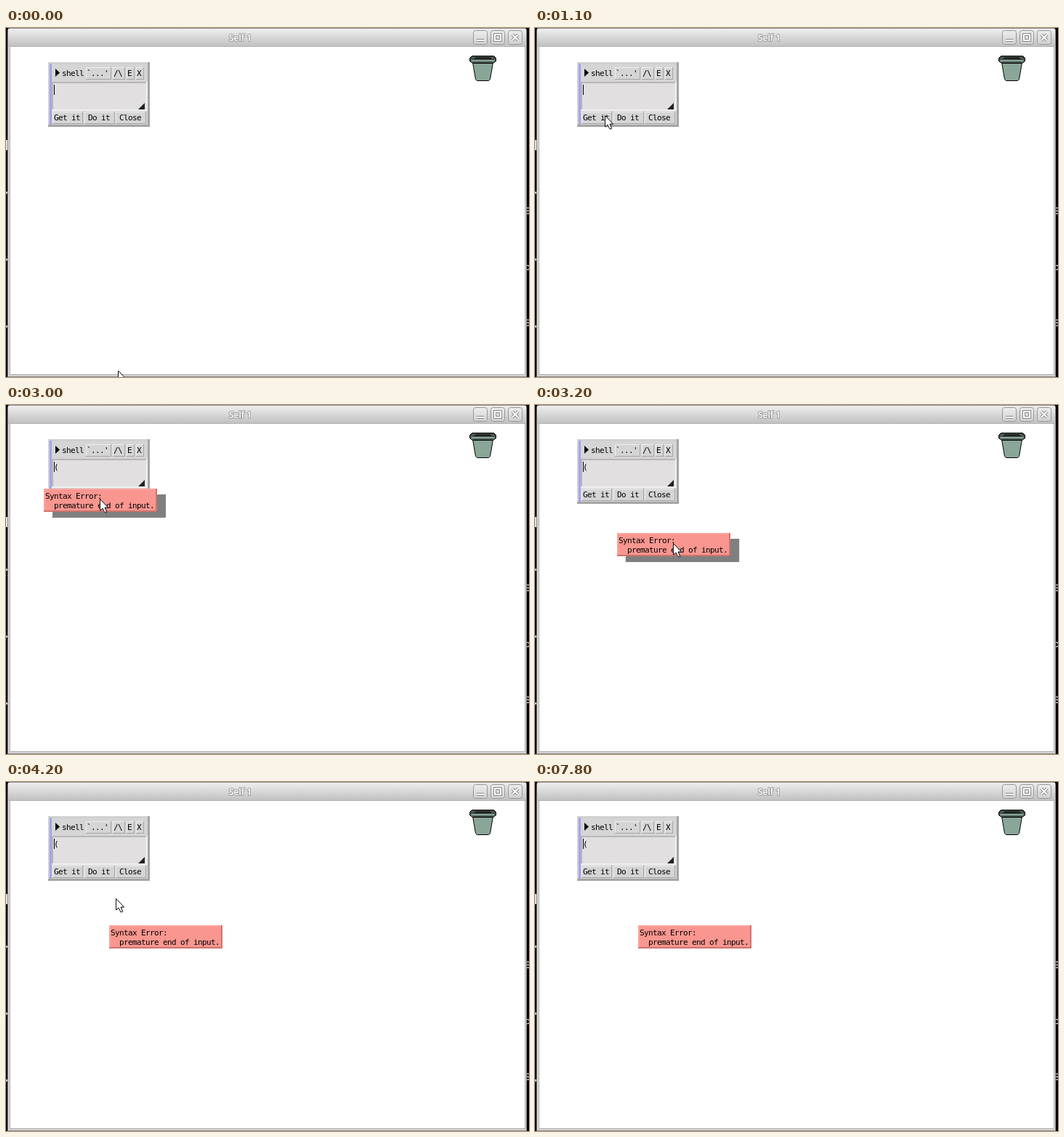
An HTML page with a canvas that plays this animation: 720 by 480 pixels, repeating every 8 s.

```html
<!DOCTYPE html>
<html lang="en">
<head>
<meta charset="utf-8">
<title>Shell error</title>
<style>
html, body { margin: 0; width: 100%; height: 100%; overflow: hidden; background: #fff; }
canvas { display: block; }
</style>
</head>
<body>
<canvas id="stage" width="720" height="480"></canvas>
<script>
const ctx = document.getElementById('stage').getContext('2d');
const LOOP = 8000, STEP = 100;
const TYPED = 1700, PRESSED = 2300, FAILED = 2500, DROPPED = 3700, GONE = 7800;
const CHAR = 6;
const PANEL = '#d6d5d6', FIELD = '#e2dfe1', LIGHT = '#efeeef', SHADE = '#a5a5a5';

// Pointer gestures; it rests between them
const start = { x: 154, y: 471 };
const moves = [
  { from: 100, to: 1000, x: 96, y: 120 },
  { from: 2900, to: 3000, x: 129, y: 129 },
  { from: 3000, to: 3200, x: 190, y: 190 },
  { from: 3200, to: 3700, x: 219, y: 211 },
  { from: 3700, to: 4200, x: 151, y: 160 },
  { from: 7600, to: 7700, x: 76, y: 172 }
];

function pointerAt(t) {
  let { x, y } = start;
  for (const m of moves) {
    const u = Math.min(1, Math.max(0, (t - m.from) / (m.to - m.from)));
    const eased = Math.sin(u * Math.PI / 2);
    x += (m.x - x) * eased;
    y += (m.y - y) * eased;
  }
  return { x: Math.round(x), y: Math.round(y) };
}

function rect(x, y, w, h, color) {
  ctx.fillStyle = color;
  ctx.fillRect(x, y, w, h);
}

function poly(points, fill, stroke) {
  ctx.beginPath();
  points.forEach(([x, y]) => ctx.lineTo(x, y));
  ctx.closePath();
  if (fill) { ctx.fillStyle = fill; ctx.fill(); }
  if (stroke) { ctx.strokeStyle = stroke; ctx.stroke(); }
}

// Shape symmetric about cx, given as [y, half width] from top to bottom
function symmetric(cx, rows, fill, stroke) {
  const left = rows.map(([y, r]) => [cx - r, y]);
  const right = rows.map(([y, r]) => [cx + r, y]);
  poly([...left, ...right.reverse()], fill, stroke);
}

function bevel(x, y, w, h, fill, light, dark, size) {
  rect(x, y, w, h, dark);
  rect(x, y, w - size, h - size, light);
  rect(x + size, y + size, w - 2 * size, h - 2 * size, fill);
}

function mono(text, x, y) {
  ctx.font = '11px "DejaVu Sans Mono", monospace';
  ctx.letterSpacing = '-0.62px';
  ctx.fillStyle = '#000';
  ctx.fillText(text, x, y);
  ctx.letterSpacing = '0px';
}

function checker() {
  const tile = document.createElement('canvas');
  tile.width = tile.height = 2;
  const c = tile.getContext('2d');
  c.fillRect(0, 0, 1, 1);
  c.fillRect(1, 1, 1, 1);
  return ctx.createPattern(tile, 'repeat');
}
const dots = checker();

function vertical(y0, y1, top, bottom) {
  const g = ctx.createLinearGradient(0, y0, 0, y1);
  g.addColorStop(0, top);
  g.addColorStop(1, bottom);
  return g;
}

function titleButton(x, drawIcon) {
  ctx.beginPath();
  ctx.roundRect(x + .5, 3.5, 19, 19, 3);
  ctx.fillStyle = vertical(3, 23, '#eee', '#cfcfcf');
  ctx.fill();
  ctx.strokeStyle = '#989898';
  ctx.stroke();
  ctx.beginPath();
  drawIcon(x + 6, 9, 8);
  for (const [width, color] of [[4, '#8a8a8a'], [2, '#fff']]) {
    ctx.lineWidth = width;
    ctx.strokeStyle = color;
    ctx.stroke();
  }
  ctx.lineWidth = 1;
}

const titleIcons = [
  (x, y, s) => { ctx.moveTo(x - 1, y + s); ctx.lineTo(x + s + 1, y + s); },
  (x, y, s) => ctx.rect(x, y, s, s),
  (x, y, s) => {
    ctx.moveTo(x, y); ctx.lineTo(x + s, y + s);
    ctx.moveTo(x + s, y); ctx.lineTo(x, y + s);
  }
];

function drawWindow() {
  rect(0, 0, 720, 480, '#000');
  // Slivers of the windows behind
  rect(0, 154, 2, 14, '#ddd');
  for (let y = 225; y < 440; y += 92) rect(0, y, 2, 3, '#bbb');
  ctx.font = '13px "DejaVu Sans", sans-serif';
  ctx.fillStyle = '#fff';
  [...'EoS'].forEach((c, i) => ctx.fillText(c, 714, 256 + i * 77));

  ctx.beginPath();
  ctx.roundRect(2, 0, 715, 480, [4, 4, 0, 0]);
  ctx.fillStyle = '#8e8e8e';
  ctx.fill();
  rect(3, 1, 713, 478, '#d4d4d4');
  rect(3, 1, 713, 25, vertical(0, 26, '#f0f0f0', '#bfbfbf'));
  rect(5, 25, 710, 452, '#b4b4b4');
  rect(6, 26, 708, 450, '#fff');

  ctx.font = '600 12px "Open Sans", sans-serif';
  ctx.lineJoin = 'round';
  ctx.lineWidth = 2;
  ctx.strokeStyle = '#a0a0a0';
  ctx.strokeText('Self 1', 307, 18);
  ctx.lineWidth = 1;
  ctx.lineJoin = 'miter';
  ctx.fillStyle = '#fff';
  ctx.fillText('Self 1', 307, 18);

  titleIcons.forEach((icon, i) => titleButton(643 + 24 * i, icon));
}

function drawTrash() {
  const cx = 656.5, green = '#8aa698';
  symmetric(cx, [[47.5, 14], [70.5, 10], [72.5, 8]], green, '#000');
  const lid = [[38.5, 15], [41.5, 18], [45.5, 18], [48.5, 14]];
  symmetric(cx, lid, green, '#000');
  symmetric(cx, lid, dots);
  symmetric(cx, [[40, 10], [43, 12]], '#222');
  rect(cx - 16, 44, 32, 2, green);
}

function button(label, x, y, w, h, textX, pressed) {
  const [light, dark] = pressed ? [SHADE, LIGHT] : [LIGHT, SHADE];
  bevel(x, y, w, h, PANEL, light, dark, 1);
  mono(label, textX, y + 12);
}

function drawShell(typed, pressed) {
  bevel(58, 47, 140, 89, PANEL, '#d0d0d0', SHADE, 3);
  rect(60, 49, 3, 84, '#a4a4ee');
  poly([[68, 56], [74, 61.5], [68, 67]], '#000');
  mono('shell', 77, 66);

  let x = 110;
  for (const label of ["`...'", '/\\', 'E', 'X']) {
    const w = label.length * CHAR + 5;
    button(label, x, 54, w, 17, x + 1);
    x += w + 2;
  }

  bevel(63, 74, 132, 40, FIELD, '#b8b6b7', '#f0f0f0', 2);
  rect(66, 78, 1, 14, '#000');
  if (typed) mono('(', 66, 89);
  poly([[191, 103], [191, 112], [182, 112]], '#222');

  ['Get it', 'Do it', 'Close'].forEach((label, i) => {
    const left = 64 + Math.round(43.5 * i);
    const textX = left + 20 - label.length * CHAR / 2;
    button(label, left, 115, 42, 17, textX, pressed && i === 0);
  });
}

function drawError(x, y, lifted) {
  const w = 156, h = 32;
  if (lifted) rect(x + 12, y + 8, w, h, dots);
  bevel(x, y, w, h, '#f9968f', '#fca39c', '#cf736d', 2);
  mono('Syntax Error:', x + 2, y + 14);
  mono('premature end of input.', x + 2 + 2 * CHAR, y + 27);
}

function drawPointer({ x, y }) {
  const arrow = [[.5, .5], [.5, 16], [4, 13], [7, 19], [9.5, 18], [7, 12], [11.5, 12]];
  ctx.save();
  ctx.translate(x, y);
  ctx.shadowColor = 'rgba(0,0,0,.3)';
  ctx.shadowBlur = 2;
  ctx.shadowOffsetX = ctx.shadowOffsetY = 1;
  poly(arrow, '#fff');
  ctx.shadowColor = 'transparent';
  poly(arrow, '#fff', '#111');
  ctx.restore();
}

function frame() {
  const t = Math.floor(performance.now() % LOOP / STEP) * STEP;
  const pointer = pointerAt(t);
  drawWindow();
  drawTrash();
  drawShell(t >= TYPED, t >= PRESSED && t < PRESSED + STEP);
  if (t >= FAILED) {
    const hand = pointerAt(Math.min(t, DROPPED));
    drawError(hand.x - 77, hand.y - 14, t <= DROPPED);
  }
  if (t < GONE) drawPointer(pointer);
  requestAnimationFrame(frame);
}
frame();
</script>
</body>
</html>
```
